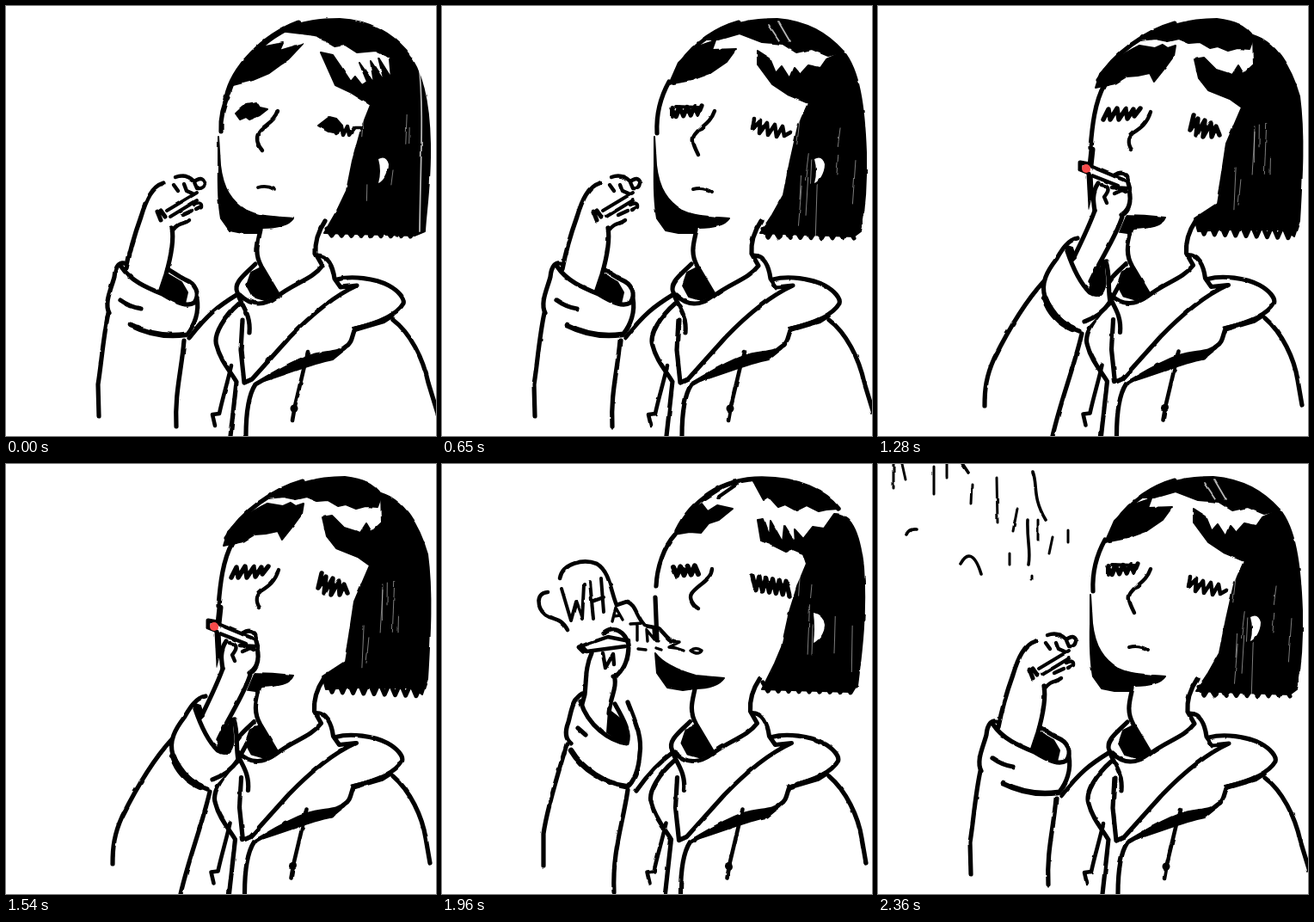
Write an HTML page that moves like this. It is 500 by 500 pixels and loops after 2440 ms.

```html
<!DOCTYPE html>
<html lang="en">
<head>
<meta charset="utf-8">
<title>Smoke break</title>
<style>
html, body { margin: 0; width: 100%; height: 100%; overflow: hidden; background: #fff; }
svg { display: block; width: 100vw; height: 100vh; }
path { stroke-linecap: round; stroke-linejoin: round; }
.line { fill: none; stroke: #000; }
.ink { fill: #000; stroke: #000; stroke-width: 2; }
.paper { fill: #fff; }
.scratch { fill: none; stroke: #fff; stroke-width: .7; opacity: .7; }
</style>
</head>
<body>
<svg viewBox="0 0 500 500">
  <defs id="defs"></defs>
  <g id="scene"></g>
</svg>
<script>
const LOOP = 2440;

const path = (cls, d, extra = '') => `<path class="${cls}" d="${d}" ${extra}/>`;
const line = (d, w = 5.2) => path('line', d, `stroke-width="${w}"`);
const ink = d => path('ink', d);
const paper = d => path('paper', d);

// Scribble between two points, swinging to both sides vertically
function zig(x1, y1, x2, y2, n, amp, w) {
  let d = '';
  for (let i = 0; i <= n; i++) {
    const k = i / n, side = i % 2 ? amp : -amp;
    d += `${i ? 'L' : 'M'}${x1 + (x2 - x1) * k},${y1 + (y2 - y1) * k + side}`;
  }
  return line(d, w);
}

// Dry-brush gaps in the dark side of the hair
function scratches(seed, n) {
  let d = '';
  const rnd = () => (seed = seed * 16807 % 2147483647) / 2147483647;
  for (let i = 0; i < n; i++) {
    const x = 416 + rnd() * 66, y = 120 + rnd() * 90;
    d += `M${x},${y}l${rnd() * 4 - 4},${15 + rnd() * 45}`;
  }
  return path('scratch', d);
}

const chin = ink('M247,152 L249,185 C252,212 262,228 280,238 C296,246 315,245 334,247 C328,256 312,258 298,258 L293,264 L275,264 L260,261 L250,247 Q246,225 247,185Z');
const nose = line('M317,122 C312,136 303,139 296,147 C290,153 290,157 298,173', 4.4);
const mouth = line('M292,213 Q303,210 314,216', 4);
const ear = paper('M433,178 Q442,173 445,184 C445,195 438,204 433,206 Q437,192 433,178');
const cheek = line('M250,148 C249,128 254,106 264,88');

const heads = {
  a: ink('M264,92 L272,74 L297,48 L322,43 L318,52 L345,44 L328,62 L306,78 L287,86Z') +
    line('M257,106 C264,72 300,35 340,20', 7) +
    ink('M318,29 C345,16 370,15 388,15 C425,17 448,32 466,52 L450,61 L430,52 L408,54 L394,45 L382,47 L360,34Z') +
    ink('M465,52 C484,75 492,110 493,160 C494,205 488,240 487,262 L475,267 L370,264 L385,238 L396,215 L403,180 L414,140 L424,115 L400,100 L383,92 L366,54 L380,57 L393,76 L401,88 L406,82 L414,92 L420,88 L411,66 L428,90 L424,64 L440,88 L433,60 L448,84 L446,62Z') +
    zig(373, 263, 476, 264, 18, 4, 5) + scratches(31, 5) +
    path('scratch', 'M480,66 C486,120 482,180 481,262', 'style="stroke-width:1.8"') + ear +
    line('M250,146 C249,128 254,112 260,100') + chin +
    ink('M267,125 L279,114 L291,112 L295,118 L304,120 L295,127 L283,132 L279,129 L272,132Z') +
    ink('M363,139 L376,129 L384,131 L391,139 L386,148 L376,146Z') +
    line('M384,148 L390,140 L392,150 L397,140 L399,150 L405,142 L412,142', 4.4) +
    line('M316,122 C312,135 302,137 294,147 C290,154 293,162 298,168', 4.4) +
    line('M293,211 Q303,208 312,213', 3.8),
  b: ink('M264,91 L275,66 L295,48 L318,40 L314,51 L342,50 L331,65 L312,78 L290,86Z') +
    line('M278,66 C295,42 320,26 345,19', 5) +
    ink('M302,39 C335,18 365,15 390,15 C425,18 448,32 467,53 L449,58 L430,50 L412,54 L396,44 L372,42 L346,32 L322,39Z') +
    path('scratch', 'M380,22 L392,40 M391,18 L405,42', 'style="stroke-width:1.8"') +
    ink('M467,53 C485,75 491,115 493,170 C494,210 490,245 487,262 L479,268 L370,264 L384,243 L397,220 L405,180 L414,140 L426,113 L402,103 L384,91 L367,68 L367,52 L381,61 L388,78 L395,70 L404,84 L409,72 L416,80 L426,69 L440,72 L447,62Z') +
    zig(373, 264, 479, 265, 17, 5, 5) + scratches(77, 10) + ear + cheek + chin +
    zig(268, 124, 302, 121, 8, 5, 5.2) + line('M268,118 L268,129 M272,117 L298,118', 4) +
    line('M363,131 L361,143 L370,134 L369,148 L378,136 L379,150 L387,138 L389,152 L396,140 L398,151 L405,147', 4.6) +
    nose + mouth,
  c: ink('M253,95 L258,79 C272,63 290,53 304,46 L322,49 L331,45 L337,49 L346,46 L344,58 L333,73 L321,88 L316,78 L302,81 L289,82 L276,90Z') +
    line('M256,86 C275,55 310,30 345,20', 5) +
    ink('M305,40 C335,21 365,15 394,15 C415,18 427,22 437,36 L432,50 L418,49 L407,52 L395,47 L386,49 L374,42 L362,43 L350,38 L337,41 L322,38Z') +
    ink('M436,34 C462,42 480,70 490,105 C496,150 493,200 490,250 L484,268 L473,260 L400,260 L372,262 L368,247 L394,230 L399,200 L405,160 L423,118 L409,108 L384,98 L373,84 L368,62 L379,60 L393,74 L412,80 L419,69 L425,79 L437,68Z') +
    zig(373, 258, 483, 263, 18, 7, 5) + scratches(211, 7) +
    line('M263,92 C252,112 249,140 247,165') +
    line('M249,167 L246,195 L248,235', 7) +
    ink('M285,243 Q310,243 334,246 C330,256 315,258 298,259 L290,264 L276,262 L270,246Z') +
    line('M262,132 L268,120 L270,132 L278,119 L280,132 L288,120 L290,131 L297,120 L298,128 L305,119', 5.4) +
    line('M367,127 L363,144 L372,131 L370,150 L380,133 L378,152 L387,136 L388,152 L393,140 L397,150', 5.4) +
    line('M317,123 C313,137 305,142 296,148 C290,153 289,160 294,167', 4.4),
  e: ink('M270,82 L285,56 L302,46 L309,55 L320,48 L338,52 L322,65 L310,69 L301,80 L288,79Z') +
    line('M273,78 C290,42 325,17 372,17 C415,17 445,32 461,52', 5.4) +
    ink('M362,20 C400,14 438,26 461,52 L447,53 L438,55 L424,48 L412,54 L399,47 L391,50 L380,38 L374,42Z') +
    line('M306,40 L326,27 M322,38 L342,24', 4) +
    ink('M456,58 C474,58 485,75 490,120 C494,175 487,225 483,258 L474,265 L372,262 L387,232 L395,213 L404,172 L414,140 L424,116 L420,104 L408,99 L400,102 L382,93 L371,89 L367,65 L374,64 L381,83 L382,66 L396,91 L398,72 L411,93 L410,76 L420,87 L431,73 L444,75Z') +
    zig(373, 259, 481, 261, 18, 5, 5) + scratches(419, 6) +
    paper('M432,174 Q444,176 445,187 C445,197 438,205 432,208 Q434,190 432,174') +
    line('M271,82 C258,96 250,120 249,142') + line('M248,155 L250,205') +
    ink('M248,220 C256,231 275,240 295,246 L328,249 C321,259 308,261 294,261 L280,263 L262,260 L250,243Z') +
    zig(269, 125, 298, 123, 7, 5, 6) + zig(361, 138, 404, 145, 11, 8, 5.4) +
    line('M314,122 C313,136 296,141 290,151 C287,156 292,165 298,168', 4.4) +
    line('M289,217 Q295,212 302,217 Q298,223 289,217', 3.4)
};

const jacket =
  line('M296,260 C293,275 288,287 297,303 L316,335') +
  line('M371,250 C363,262 359,274 360,288 L368,302 C356,318 335,322 315,338 C300,349 285,349 272,336') +
  ink('M280,325 L285,310 L297,304 L315,336 L301,342 L287,338Z') +
  line('M290,300 C277,313 264,322 269,333 C273,348 285,357 283,380') +
  line('M362,290 C374,290 380,302 382,317 L389,327 L408,325 C384,336 358,356 330,385 L286,434 L277,438 L273,400 L275,365') +
  line('M385,318 C402,313 430,317 445,325 C456,331 464,340 462,346 C455,358 435,368 406,375 C402,383 403,392 395,396 C387,405 370,402 352,408 C325,418 308,430 290,440 C282,452 279,472 279,500') +
  ink('M300,436 C330,416 352,406 391,402 L380,411 C355,416 335,425 300,436') +
  ink('M403,374 C420,371 435,364 451,361 L440,368 L406,378Z') +
  line('M271,346 C255,360 240,382 245,395 C249,412 261,425 268,437 Q265,465 261,500') +
  line('M262,418 C257,440 252,455 248,474 L240,475 L243,488', 4.6) +
  line('M351,402 L336,465 L333,482', 4.6) +
  '<circle cx="335" cy="468" r="4.5"/>';

const bodies = {
  wide: jacket + line('M450,365 C470,380 485,410 491,438 L502,474'),
  near: `<g transform="translate(-1.5 -.5)">${jacket}</g>` +
    line('M450,363 C470,380 484,410 488,435 L493,464')
};

const rest =
  line('M183,206 C170,210 163,225 157,245 C148,270 143,290 140,306') +
  line('M193,258 C196,275 190,298 186,312 L180,330') +
  line('M140,300 C132,296 127,303 126,315 C122,330 114,345 120,357') +
  line('M134,303 C145,320 165,328 182,335 C200,346 211,350 219,345 C226,335 221,323 208,318 C200,314 195,310 188,306') +
  ink('M178,332 L187,311 L204,321 L211,333 L208,346 L192,340Z') +
  line('M222,340 C225,356 219,371 211,381') +
  line('M145,371 C165,381 188,385 209,382', 6.5) + line('M133,342 Q144,350 157,352') +
  line('M119,357 C113,385 111,415 107,440 L108,477') +
  line('M207,389 C204,425 196,450 198,489') +
  line('M268,336 C247,349 235,358 213,386') +
  line('M197,199 C205,196 213,198 219,204 Q228,197 231,206 Q230,213 222,212 L219,205', 4.4) +
  line('M187,238 L222,217 M191,245 L222,226', 4) +
  line('M176,239 L180,249 M180,238 L185,245', 5) +
  line('M195,208 L200,215 M207,207 L210,215 L217,218 M219,231 Q228,227 227,234 L221,237 M216,238 L205,243 M213,249 C206,255 202,250 193,262', 4.4);

const drag =
  paper('M253,205 L238,266 L217,275 L193,322 L205,360 L238,380 L271,344 L266,296 L292,235 L290,205Z') +
  paper('M246,187 L289,202 L284,211 L243,195Z') +
  line('M249,187 L290,204 M246,196 L279,209', 4.4) +
  line('M235,182 L246,184 M235,190 L245,194 M235,182 L235,190', 5) +
  '<circle cx="242" cy="189" r="5" fill="#f74b4b"/>' +
  line('M275,197 C285,190 292,197 290,205 M256,206 C249,216 250,226 252,238 M290,206 C296,225 293,237 283,243') +
  line('M260,208 C272,210 267,217 263,222 L266,229 M272,211 L288,212 M275,218 L284,214 L288,216', 4.4) +
  line('M252,238 C246,255 236,275 228,292') +
  line('M284,245 C277,268 260,292 247,320') +
  ink('M247,319 L262,300 L263,325 L257,337 L246,332Z') +
  ink('M217,278 L226,281 L230,293 L226,297Z') +
  line('M232,270 C220,272 213,285 207,295 C197,308 189,322 194,338 C203,357 216,372 234,378') +
  line('M220,285 C226,303 235,322 246,333 Q260,341 263,323 L261,296') +
  line('M265,297 C270,312 267,328 270,344 Q259,360 240,367') +
  line('M194,340 C200,358 212,369 226,375', 8) +
  line('M193,320 C170,345 150,380 135,410 C126,430 124,445 124,464') +
  line('M237,381 C228,420 212,460 203,500') + line('M268,347 L290,307');

const hold =
  paper('M168,222 L190,193 L214,196 L217,215 L200,250 L197,285 L163,280Z') +
  line('M174,220 C167,235 168,248 166,268 L163,279') +
  line('M201,250 C203,262 196,270 194,290') +
  line('M188,197 C202,187 213,196 217,210 C217,226 212,238 204,246 L199,247') +
  line('M187,220 L190,237 L199,221 L200,233', 4.4) +
  line('M164,211 L193,201 L213,205 M168,218 L213,212 M217,205 L217,213', 4.4) +
  line('M159,213 L164,218 M162,211 L167,217', 5) +
  line('M163,267 C151,274 150,290 147,300 C142,313 145,321 150,325') +
  line('M161,276 C170,305 195,322 215,325 C219,312 213,300 201,279') +
  ink('M194,286 L207,296 L217,317 L212,326 L192,312Z') +
  line('M216,277 C224,298 233,316 230,337 C229,355 223,370 215,376') +
  line('M150,333 C163,355 190,372 215,375', 6.5) + line('M158,307 L167,315') +
  line('M145,326 C135,360 122,400 118,430 L118,467') +
  line('M216,379 C210,420 198,450 200,498') + line('M226,380 C240,360 252,347 270,334');

const arms = {
  rest, drag, hold,
  lift: `<g transform="translate(9 5)">${rest}</g>`,
  near: `<g transform="rotate(-7 235 390)">${drag}</g>`
};

const cloud =
  line('M137,133 C140,115 165,110 180,116 C195,125 196,147 203,164 L215,160 C226,164 225,176 236,188 L252,191 C260,198 263,206 270,206', 4.6) +
  line('M123,149 C108,150 111,168 120,175 C130,182 138,178 146,193', 4.6) +
  line('M139,145 L150,182 L156,160 L163,180 L165,140 M172,137 L176,180 M185,133 L188,172 M174,160 L188,155', 4) +
  line('M198,183 L202,167 L210,181 M200,177 L207,176 M219,186 L234,185 M227,186 L227,205 M239,206 L238,193 L247,204 L246,191 M228,215 L237,216 M249,214 L255,216', 3.4) +
  line('M266,206 L276,207 L264,213 L272,214 L281,217', 3.4);

const wisps =
  line('M18,0 V28 M28,0 L32,18 M65,3 V35 M80,0 V16 M109,24 L108,46 M138,16 L139,68 M162,52 L157,78 M186,65 V88 M203,85 L199,104 M221,77 V92 M153,104 V117 M179,130 V134', 3) +
  line('M97,-2 L105,10 M180,9 C186,25 179,38 195,65 M174,65 C173,90 178,100 175,117 M33,82 Q36,75 44,76 M96,116 C103,103 112,102 120,128', 3.6);

const blown = (scale, dx, dy, extra = '') =>
  `<g transform="translate(${290 + dx} ${215 + dy}) scale(${scale}) translate(-290 -215)" ${extra}>${cloud}</g>`;

const smokes = {
  puff: blown(.45, 0, 0),
  word: cloud,
  grow: blown(1.25, -6, -8),
  rise: blown(1.45, -18, -34),
  fray: blown(1.5, -14, -62, 'stroke-dasharray="22 14"'),
  drift: `<g transform="translate(0 16)">${wisps}</g>`,
  wisps
};

// start time, head, arm, wobble, smoke
const shots = [
  [0, 'a', 'rest', 0], [130, 'b', 'rest', 1], [260, 'a', 'rest', 0], [390, 'b', 'rest', 1],
  [520, 'a', 'rest', 0], [650, 'b', 'rest', 1], [780, 'a', 'rest', 0], [910, 'b', 'rest', 1],
  [1040, 'a', 'lift', 2], [1120, 'b', 'hold', 3], [1200, 'c', 'near', 0],
  [1280, 'c', 'drag', 2], [1410, 'c', 'drag', 3], [1540, 'c', 'drag', 2], [1670, 'c', 'drag', 3],
  [1800, 'c', 'near', 1], [1880, 'e', 'hold', 0, 'puff'], [1960, 'e', 'hold', 3, 'word'],
  [2040, 'e', 'hold', 2, 'grow'], [2120, 'a', 'rest', 0, 'rise'], [2200, 'b', 'rest', 1, 'fray'],
  [2280, 'a', 'rest', 0, 'drift'], [2360, 'b', 'rest', 1, 'wisps']
];

defs.innerHTML = [3, 11, 24, 38].map((seed, i) => `
  <filter id="wobble${i}" filterUnits="userSpaceOnUse" x="0" y="0" width="500" height="500" color-interpolation-filters="sRGB">
    <feTurbulence type="fractalNoise" baseFrequency=".06" numOctaves="2" seed="${seed}"/>
    <feDisplacementMap in="SourceGraphic" scale="2.4" xChannelSelector="R" yChannelSelector="G"/>
  </filter>`).join('');
// The displacement map takes the turbulence as its second input
document.querySelectorAll('feDisplacementMap').forEach((map, i) => {
  map.previousElementSibling.setAttribute('result', 'noise');
  map.setAttribute('in2', 'noise');
});

let shown;
function tick() {
  const t = performance.now() % LOOP;
  const shot = shots.findLast(s => s[0] <= t);
  if (shot !== shown) {
    shown = shot;
    const [, head, arm, wobble, smoke] = shot;
    const body = head === 'a' || head === 'b' ? 'wide' : 'near';
    scene.setAttribute('filter', `url(#wobble${wobble})`);
    scene.innerHTML = heads[head] + bodies[body] + (smokes[smoke] || '') + arms[arm];
  }
  requestAnimationFrame(tick);
}
tick();
</script>
</body>
</html>
```
